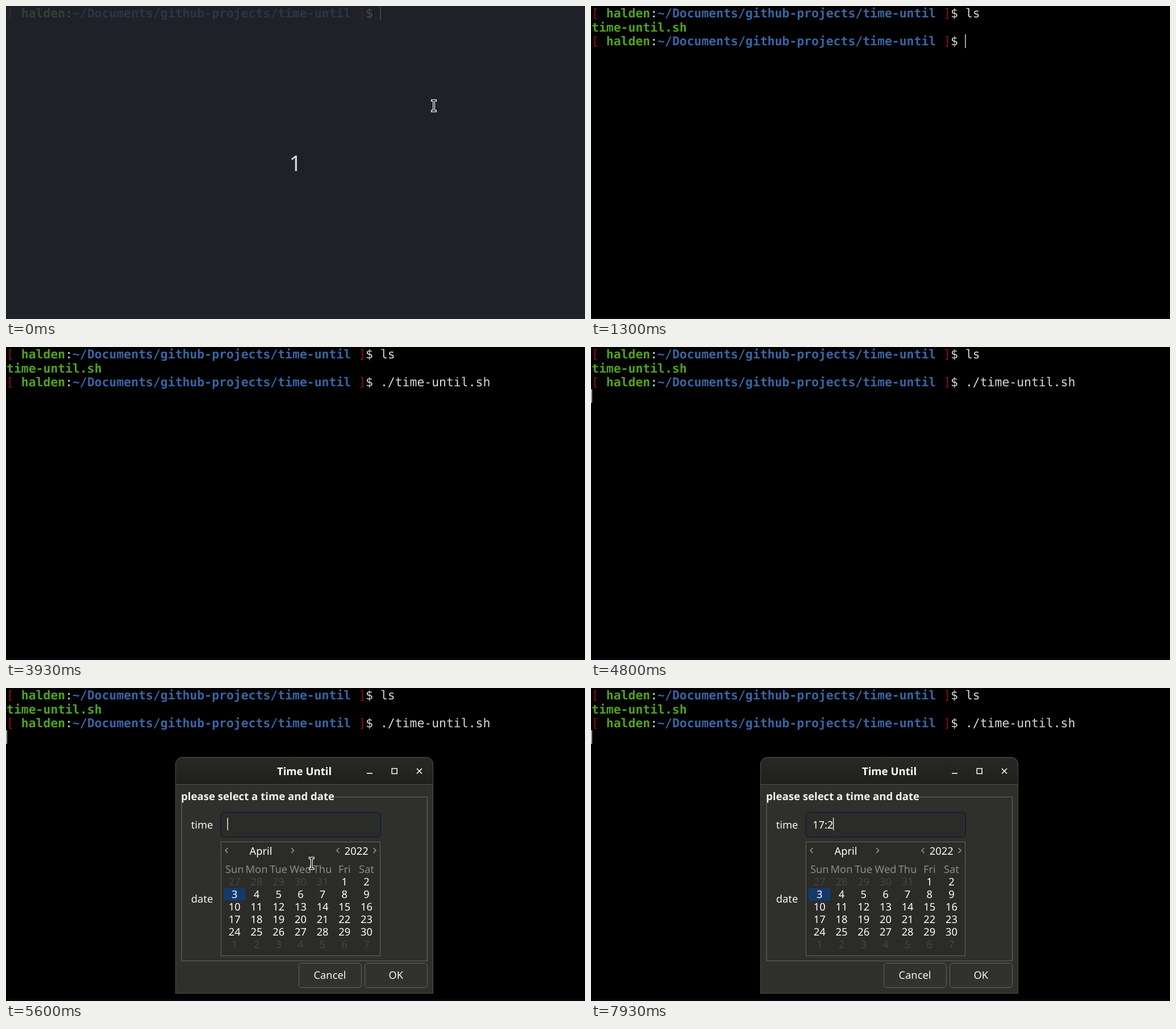
An HTML page that plays this animation: 1019 px wide and 550 px high, repeating every 8 s.

```html
<!DOCTYPE html>
<html lang="en">
<head>
<meta charset="utf-8">
<title>Time Until</title>
<style>
  html, body { margin: 0; width: 100%; height: 100%; overflow: hidden; background: #000; }
  svg { display: block; width: 1019px; height: 550px; }
  text { white-space: pre; text-rendering: geometricPrecision; }
  .term { font: 21.43px "DejaVu Sans Mono", monospace; }
  .ui { font: 18.3px "Noto Sans", "Open Sans", sans-serif; }
  .bold { font-weight: bold; }
  .ui.bold { font-size: 18.6px; }
</style>
</head>
<body>
<svg id="stage" viewBox="0 0 1019 550"></svg>
<script>
const LOOP = 8000;
const CELL = 12.9, ROW = 24.5;
const GREEN = '#53a31b', BLUE = '#3a65a5', RED = '#960a1a', WHITE = '#d7dad4';
const stage = document.getElementById('stage');

function add(parent, tag, attrs, content) {
  const el = document.createElementNS('http://www.w3.org/2000/svg', tag);
  for (const key in attrs) el.setAttribute(key, attrs[key]);
  if (content !== undefined) el.textContent = content;
  parent.appendChild(el);
  return el;
}
const group = parent => add(parent, 'g', {});
const show = (el, on) => el.setAttribute('visibility', on ? 'visible' : 'hidden');
const box = (parent, x, y, width, height, rx, fill, stroke = 'none') =>
  add(parent, 'rect', { x, y, width, height, rx, fill, stroke });
const line = (parent, d, stroke, width = 1) =>
  add(parent, 'path', { d, stroke, fill: 'none', 'stroke-width': width });

// Latest entry of a [time, ...values] list at time t
const at = (keys, t) => keys.reduce((found, key) => key[0] <= t ? key : found);

// Terminal
const termText = (parent, row, col, text, fill, bold) =>
  add(parent, 'text', { class: bold ? 'term bold' : 'term', x: 1 + col * CELL, y: 20.3 + row * ROW, fill }, text);

function prompt(row) {
  const g = group(stage);
  termText(g, row, 0, '[', RED);
  termText(g, row, 2, 'halden', GREEN, true);
  termText(g, row, 8, ':', WHITE);
  termText(g, row, 9, '~/Documents/github-projects/time-until', BLUE, true);
  termText(g, row, 48, ']', RED);
  termText(g, row, 49, '$', WHITE);
  return g;
}

box(stage, 0, 0, 1019, 550, 0, '#000');
box(stage, 0, 547, 1019, 3, 0, '#0d0410');
prompt(0);
const listing = termText(stage, 1, 0, 'time-until.sh', GREEN, true);
const secondPrompt = prompt(2);
const firstCommand = termText(stage, 0, 51, '', WHITE);
const secondCommand = termText(stage, 2, 51, '', WHITE);
const caret = box(stage, 0, 0, 1.4, 24, 0, '#e4e6e0');

const firstTyping = [[0, ''], [1000, 'l'], [1100, 'ls']];
const secondTyping = [[0, ''], [2570, '.'], [2730, './'], [3030, './t'], [3130, './ti'], [3330, './time-until.sh']];
// [time, row, column]; no row means blinked off
const caretKeys = [
  [0, 0, 51], [1000, 0, 52], [1100, 0, 53], [1270, 2, 51], [1900], [2500, 2, 51],
  [2570, 2, 52], [2730, 2, 53], [3030, 2, 54], [3130, 2, 55], [3330, 2, 67],
  [3930], [4000, 3, 0], [4600], [4800, 3, 0]
];

// Dialog
const backdrop = {
  body: '#343431', border: '#1e1e1c', label: '#92928f', day: '#d8d8d4', weekday: '#5c5c59',
  arrow: '#74746f', caret: '#8d8d89', view: '#2e2e2b', button: '#333330', focused: false
};
const active = {
  body: '#2f2f2c', border: '#656561', label: '#f4f4f2', day: '#ffffff', weekday: '#8b8b87',
  arrow: '#92928e', caret: '#f2f2f0', view: '#2b2b28', button: '#31312e', focused: true
};

function dialog(theme) {
  const g = group(stage);
  const label = (x, y, text, fill, bold, anchor = 'middle') =>
    add(g, 'text', { class: bold ? 'ui bold' : 'ui', x, y, fill, 'text-anchor': anchor }, text);
  const chevron = (x, dir) => line(g, `M${x - 2 * dir} 281l${4.5 * dir} 4.5l${-4.5 * dir} 4.5`, theme.arrow, 1.7);

  add(g, 'path', { d: 'M298.5 536.5V134a12 12 0 0 1 12-12H739.5a12 12 0 0 1 12 12V536.5Z', fill: theme.body });
  add(g, 'path', { d: 'M298.5 169V134a12 12 0 0 1 12-12H739.5a12 12 0 0 1 12 12V169Z', fill: 'url(#titlebar)' });
  line(g, 'M298.5 169.5H751.5', '#50504c');
  line(g, 'M298.5 536.5V134a12 12 0 0 1 12-12H739.5a12 12 0 0 1 12 12V536.5Z', '#50504c');
  label(525, 153.3, 'Time Until', '#fff', true);
  line(g, 'M635 150H645', '#fff', 1.6);
  line(g, 'M679.2 141.5h9v9h-9z', '#fff', 1.5);
  line(g, 'M723 141.5l9 9m0-9l-9 9', '#fff', 1.6);

  line(g, 'M579 191.5H741.5V479.5H309V201', theme.border, 1.2);
  label(308, 197.2, 'please select a time and date', theme.label, true, 'start');
  label(345, 246.5, 'time', theme.label);
  label(345, 376.7, 'date', theme.label);

  if (theme.focused) {
    box(g, 378, 218.5, 281, 43.5, 6, theme.view, '#0b0e13');
    box(g, 379.3, 219.8, 278.4, 40.9, 5, 'none', '#17365f');
  } else {
    box(g, 378.5, 218.5, 280, 43, 6, theme.view, theme.border);
  }

  box(g, 378.5, 270.5, 280, 200, 0, theme.view, theme.border);
  line(g, 'M379 301.5H658', theme.focused ? '#272725' : '#252523');
  chevron(388.5, -1);
  chevron(504, 1);
  chevron(584.5, -1);
  chevron(648.5, 1);
  label(448.5, 292.7, 'April', theme.day);
  label(616.7, 292.7, '2022', theme.day);

  const columnX = i => 402.3 + 38.7 * i;
  box(g, 383, 351.5, 38.5, 22, 3, '#143a6c');
  'Sun Mon Tue Wed Thu Fri Sat'.split(' ').forEach((name, i) => label(columnX(i), 325, name, theme.weekday));
  for (let i = 0; i < 42; i++) {
    const day = i - 4;
    const inMonth = day >= 1 && day <= 30;
    const number = day < 1 ? day + 31 : inMonth ? day : day - 30;
    label(columnX(i % 7), 347.3 + 22 * Math.floor(i / 7), number, inMonth ? theme.day : '#464643');
  }

  box(g, 515.5, 483.5, 110, 43, 5, theme.button, theme.border);
  box(g, 631.5, 483.5, 110, 43, 5, theme.button, theme.border);
  label(570, 511, 'Cancel', theme.label);
  label(686.3, 511, 'OK', theme.label);
  return g;
}

const gradient = add(add(stage, 'defs', {}), 'linearGradient', { id: 'titlebar', x2: 0, y2: 1 });
add(gradient, 'stop', { offset: 0, 'stop-color': '#282825' });
add(gradient, 'stop', { offset: 1, 'stop-color': '#1f1f1c' });

const dialogBack = dialog(backdrop);
const dialogFront = dialog(active);
const entryText = add(stage, 'text', { class: 'ui', x: 390, y: 246.5, fill: '#fff' });
const entryCaret = box(stage, 389.4, 228, 1.4, 22, 0, backdrop.caret);
// [time, text, caret x]
const entryKeys = [
  [0, '', 389.4], [6230, '1', 400.2], [7330, '17', 410.6], [7700, '17:', 415.5], [7930, '17:2', 425.9]
];

// Countdown veil
const veil = group(stage);
box(veil, 0, 0, 1019, 550, 0, '#272a32').setAttribute('opacity', 0.8);
add(veil, 'text', {
  x: 498.5, y: 290, fill: '#d3dad4', 'font-size': 38, 'font-family': '"Noto Sans", "Open Sans", sans-serif'
}, '1');

// Text pointer
const pointer = group(stage);
const beam = 'M-3 -9.3H3M0 -9.3V9.3M-3 9.3H3';
for (const [color, width] of [['#fff', 4], ['#000', 1.5]]) {
  line(pointer, beam, color, width).setAttribute('stroke-linecap', 'square');
}
const pointerPath = [[5600, 538, 309], [5730, 510, 200], [5830, 480, 111], [5930, 470, 205], [6000, 467, 246]];

function pointerAt(t) {
  if (t < 1000 || (t >= 4130 && t < 4670)) return [753, 175.3];
  if (t < 5600 || t >= 6230) return null;
  const next = pointerPath.findIndex(p => p[0] > t);
  if (next < 0) return [467, 246];
  const [t0, x0, y0] = pointerPath[next - 1], [t1, x1, y1] = pointerPath[next];
  const k = (t - t0) / (t1 - t0);
  return [x0 + (x1 - x0) * k, y0 + (y1 - y0) * k];
}

function render(t) {
  show(veil, t < 200);
  firstCommand.textContent = at(firstTyping, t)[1];
  secondCommand.textContent = at(secondTyping, t)[1];
  show(listing, t >= 1230);
  show(secondPrompt, t >= 1270);

  const [, row, col] = at(caretKeys, t);
  show(caret, row !== undefined);
  if (row !== undefined) {
    caret.setAttribute('x', 0.4 + col * CELL);
    caret.setAttribute('y', 0.7 + row * ROW);
  }

  const focus = Math.min(1, Math.max(0, (t - 5150) / 220));
  show(dialogBack, t >= 5130);
  show(dialogFront, t >= 5130);
  dialogFront.setAttribute('opacity', focus);

  const [, typed, caretX] = at(entryKeys, t);
  entryText.textContent = typed;
  entryCaret.setAttribute('x', caretX);
  entryCaret.setAttribute('fill', focus < 0.5 ? backdrop.caret : active.caret);
  show(entryCaret, t >= 5130 && (t < 5930 || t >= 6230));

  const spot = pointerAt(t);
  show(pointer, spot);
  if (spot) pointer.setAttribute('transform', `translate(${spot})`);
}

const start = performance.now();
function tick() {
  render((performance.now() - start) % LOOP);
  requestAnimationFrame(tick);
}
tick();
</script>
</body>
</html>
```
